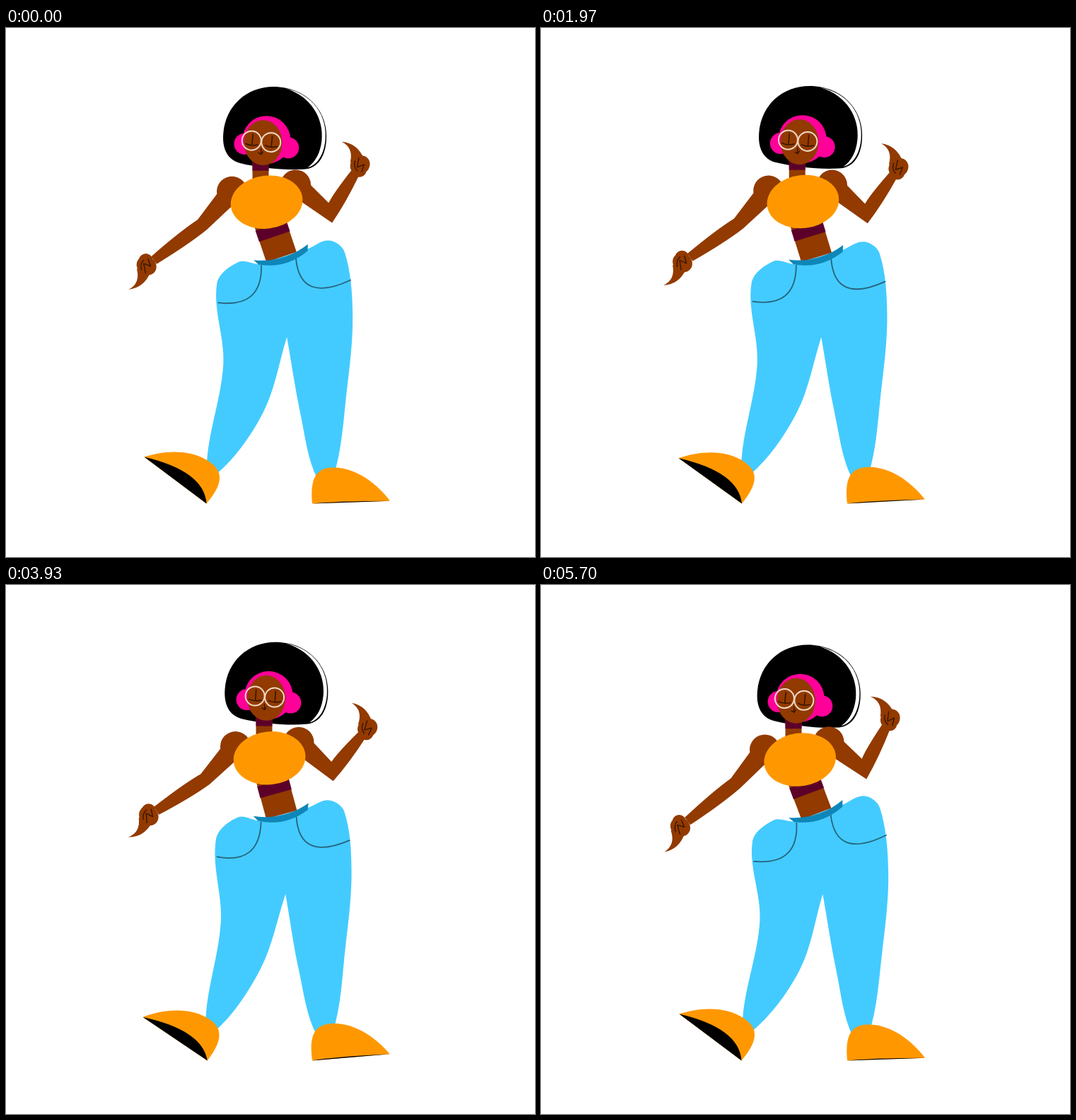
Recreate the animation shown at these times as an HTML page with a canvas. Size 748x748 px, loop 5.73 s.

```html
<!DOCTYPE html>
<html lang="en">
<head>
<meta charset="utf-8">
<title>Dancer</title>
<style>
  html, body { margin: 0; width: 100%; height: 100%; overflow: hidden; background: #fff; }
  canvas { display: block; width: 748px; height: 748px; }
</style>
</head>
<body>
<canvas id="stage" width="748" height="748"></canvas>
<script>
const ctx = document.getElementById('stage').getContext('2d');
const LOOP = 5730, CYCLE = 24, BEAT = 6, RAD = Math.PI / 180;
const SKIN = '#923a00', ORANGE = '#ff9800', BLUE = '#43cbff', BELT = '#0f86b8',
      MAROON = '#5c0029', PINK = '#ff0099', INK = '#321300', SEAM = '#28637c';

const HAIR = new Path2D('M-73,14C-73,-28 -42,-58 0,-58C44,-58 73,-26 73,12C73,38 62,53 44,55C18,59 -20,58 -45,54C-64,51 -73,36 -73,14Z');
const SHINE = new Path2D('M8,-57C50,-52 72,-22 71.5,12C71,34 62,48 50,52C61,42 66,30 66.5,12C67,-18 47,-49 8,-57Z');
const THUMB = new Path2D('M4,-10Q27,-16 42,0Q25,-8 12,8L0,8Z');
const FINGERS = new Path2D('M-9,4L-3,-5L0,5L9,-5M-4,8Q4,9 9,2');
const LID = new Path2D('M1,-9L1,5M-8,5Q0,8.5 9,5');
const NOSE = new Path2D('M-4,0L0,2L2,-2M0,2L-1,-6');
const SHOE = new Path2D('M0,0C-2,-34 6,-50 30,-50C62,-50 92,-26 110,0Z');
const WAISTBAND = new Path2D('M-40,0Q0,16 40,0L37,9Q0,25 -35,8Z');

const lerp = (a, b, k) => a + (b - a) * k;
const mix = (a, b, k) => a.map((v, i) => lerp(v, b[i], k));
const clamp = v => Math.min(1, Math.max(0, v));
const smooth = u => u * u * (3 - 2 * u);
const dir = deg => [Math.cos(deg * RAD), Math.sin(deg * RAD)];

// The dance alternates a quick swing with a slow drift, six drawings each:
// swing right, drift, swing left, drift.
function timing(phase) {
  const p = (phase - 2 + CYCLE) % CYCLE, beat = Math.floor(p / BEAT), u = p % BEAT / BEAT;
  const swing = beat % 2 === 0;
  const eased = swing ? smooth(u) : u * u;
  return {
    track: (...v) => lerp(v[beat], v[(beat + 1) % 4], eased),
    arc: swing ? Math.sin(Math.PI * u) : 0
  };
}

function fill(color, path) {
  ctx.fillStyle = color;
  ctx.fill(path);
}

function line(color, width, path, cap = 'round') {
  ctx.strokeStyle = color;
  ctx.lineWidth = width;
  ctx.lineCap = cap;
  ctx.lineJoin = 'round';
  ctx.stroke(path);
}

function oval(color, x, y, rx, ry = rx, turn = 0) {
  const p = new Path2D();
  p.ellipse(x, y, rx, ry, turn * RAD, 0, 7);
  fill(color, p);
}

function bar(color, width, x1, y1, x2, y2) {
  line(color, width, new Path2D(`M${x1},${y1}L${x2},${y2}`), 'butt');
}

function local(x, y, turn, sx, sy, draw) {
  ctx.save();
  ctx.translate(x, y);
  ctx.rotate(turn * RAD);
  ctx.scale(sx, sy);
  draw();
  ctx.restore();
}

// Smooth curve through points, with handles a third of each span long.
function spline(path, pts) {
  const last = pts.length - 1;
  const handle = (i, len) => {
    const a = pts[Math.max(0, i - 1)], b = pts[Math.min(last, i + 1)];
    const k = len / 3 / Math.hypot(b[0] - a[0], b[1] - a[1]);
    return [(b[0] - a[0]) * k, (b[1] - a[1]) * k];
  };
  path.lineTo(...pts[0]);
  for (let i = 0; i < last; i++) {
    const [x, y] = pts[i], [X, Y] = pts[i + 1], len = Math.hypot(X - x, Y - y);
    const [hx, hy] = handle(i, len), [kx, ky] = handle(i + 1, len);
    path.bezierCurveTo(x + hx, y + hy, X - kx, Y - ky, X, Y);
  }
}

function hair(nod) {
  const [x, y, turn] = mix([381, 141, 5], [410, 138.5, -5.5], nod);
  local(x, y, turn, 1, 1, () => {
    fill('#000', HAIR);
    fill('#fff', SHINE);
  });
}

function head(nod, sway) {
  const turn = lerp(5, -6, sway), [cos, sin] = dir(turn);
  const [bx, by] = mix([368, 158], [411.5, 156], nod);
  oval(PINK, bx, by, 34);
  for (const side of [-1, 1]) oval(PINK, bx + side * 31 * cos, by + 8.5 + side * 31 * sin, 15);

  const neck = lerp(360.5, 416.5, sway);
  bar(SKIN, 23, neck, 180, neck, 216);
  bar(MAROON, 23, neck, 186, neck, 201.5);

  const [x, y] = mix([364, 162], [414.5, 160], sway);
  oval(SKIN, x, y, 27, 32);
  const gaze = lerp(-2.5, 1.5, sway);
  for (const side of [-1, 1]) {
    local(x + gaze + side * 13.8 * cos, y - 1.8 + side * 13.8 * sin, turn, 1, 1, () => {
      line(INK, 1.5, LID);
      const lens = new Path2D();
      lens.arc(0, 0, 13.5, 0, 7);
      line('#efd8c6', 2, lens);
    });
  }
  local(x + gaze, y + 14.5, turn, 1, 1, () => line(INK, 1.3, NOSE));
}

// Angles in degrees: upper arm, forearm, thumb.
function arm(x, y, upper, fore, reach, thumb, flip) {
  const u = dir(upper), v = dir(fore), half = (fore - upper) / 2;
  const ex = x + u[0] * 63, ey = y + u[1] * 63;
  const across = (px, py, [dx, dy], w) => [px - dy * w, py + dx * w];
  const miter = 9.5 / Math.max(.6, Math.cos(half * RAD));
  const along = k => [ex + v[0] * reach * k, ey + v[1] * reach * k];
  const shape = new Path2D();
  for (const side of [1, -1]) {
    const run = [
      across(x, y, u, 15 * side),
      across(ex, ey, dir(upper + half), miter * side),
      across(...along(.38), v, 11 * side),
      across(...along(1), v, 6.5 * side)
    ];
    if (side < 0) run.reverse();
    shape.lineTo(...run[0]);
    if (side > 0) shape.lineTo(...run[1]);
    const bend = side > 0 ? [run[2], run[3]] : [run[1], run[2]];
    shape.quadraticCurveTo(...bend[0], ...bend[1]);
    shape.lineTo(...run[3]);
  }
  fill(SKIN, shape);
  oval(SKIN, x, y, 21.5);
  local(...along(1 + 13 / reach), thumb, 1, flip, () => {
    fill(SKIN, THUMB);
    oval(SKIN, 0, 0, 13, 14.5);
    oval(SKIN, -5, 5, 10);
    line(INK, 1.3, FINGERS);
  });
}

function trousers(sway) {
  // Each point: place when leaning left, then its travel when leaning right.
  const lean = pts => pts.map(([x, y, dx, dy]) => [x + dx * sway, y + dy * sway]);
  const path = new Path2D();
  spline(path, lean([
    [356, 334, 0, -9], [328, 331, -10, -28], [298, 362, -14, -25], [307, 475, -39, 10],
    [284, 612, -20, -3], [296, 632, -18, -3], [363, 544, -39, -16], [397, 437, -22, -1]
  ]));
  spline(path, lean([
    [397, 437, -22, -1], [416, 545, -23, 0], [440, 637, -12, -15], [462, 637, -7, -31],
    [482, 510, -23, 0], [490, 405, -18, -8], [479, 318, -6, 35], [457, 301, -2, 43], [426, 313, 0, 32]
  ]));
  fill(BLUE, path);
  const pocket = (a, b) => {
    const [x, y, ...bend] = mix(a, b, sway), seam = new Path2D();
    seam.moveTo(x, y);
    seam.quadraticCurveTo(...bend);
    line(SEAM, 1.8, seam);
  };
  pocket([361, 336, 362, 396, 300, 388], [356, 327, 320, 388, 282, 343]);
  pocket([410, 326, 416, 390, 487, 357], [416, 346, 402, 408, 470, 409]);
}

function torso(sway, lift) {
  const [x1, y1, x2, y2] = mix([375, 280, 389.5, 324], [407, 279, 391.5, 332], sway);
  const part = k => [lerp(x1, x2, k), lerp(y1, y2, k)];
  bar(SKIN, 45, ...part(-.3), x2, y2);
  bar(MAROON, 46, ...part(-.02), ...part(.34));
  const [bx, by, tilt] = mix([388.5, 317, -16], [390.5, 325.5, 18.4], sway);
  local(bx, by, tilt, 1, 1, () => fill(BELT, WAISTBAND));
  const [x, y, turn] = mix([369, 246, -7], [414, 245.5, 7], sway);
  oval(ORANGE, x, y + lift, 51, 37.5, turn);
}

function shoe(x, tilt, side) {
  local(x, 672.5, -tilt * side, side, 1, () => {
    fill(ORANGE, SHOE);
    fill('#000', new Path2D(`M0,0Q30,${-Math.max(2.5, tilt - 2)} 110,0Z`));
  });
}

function draw(phase) {
  const { track, arc } = timing(phase);
  const sway = track(.08, 1.05, .94, -.08);
  const nod = track(.08, .97, .97, -.05);
  const bob = track(-2, 2, -2, 2) - 6.5 * arc;
  const lift = bob * .6, tuck = 10 * arc;

  ctx.fillStyle = '#fff';
  ctx.fillRect(0, 0, 748, 748);
  local(0, bob, 0, 1, 1, () => {
    hair(nod);
    head(nod, sway);
  });

  const [lx, ly, rx, ry] = mix([320, 231, 410, 222], [376, 215, 459, 241], sway);
  arm(lx, ly + lift, track(133, 168, 160, 131), track(147, 268, 253, 141),
    track(82, 65, 63, 87) - tuck, track(134, 326, 327, 121), 1);
  arm(rx, ry + lift, track(41, 67, 66, 37), track(-51, 65, 53, -64),
    track(66, 84, 86, 67) - tuck, track(-122, 83, 68, -133), -1);

  trousers(sway);
  torso(sway, lift);
  const step = clamp(sway);
  shoe(lerp(283.5, 298.5, step), lerp(36.8, 2, step), -1);
  shoe(lerp(433, 434, step), lerp(2, 36.6, Math.max(0, sway)), 1);
}

// Five drawings per 200 ms, the first one held longer.
function frameAt(t) {
  const r = t % 200;
  return Math.floor(t / 200) * 5 + [70, 100, 130, 170].filter(s => r >= s).length;
}

const start = performance.now();
let shown = -1;
function tick() {
  const frame = frameAt((performance.now() - start) % LOOP);
  if (frame !== shown) draw((shown = frame) % CYCLE);
  requestAnimationFrame(tick);
}
tick();
</script>
</body>
</html>
```
